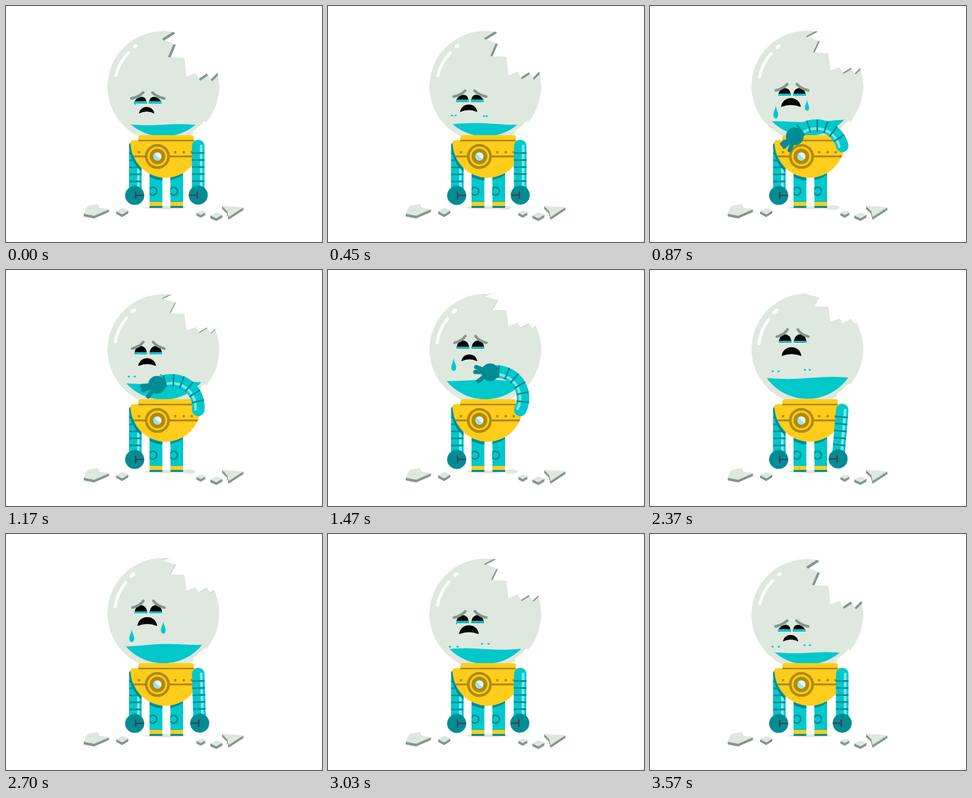
An HTML page with a canvas for the animation above (3600 ms loop, 480x360 px).

```html
<!DOCTYPE html>
<html>
<head>
<meta charset="utf-8">
<title>Sad robot</title>
<style>
html, body { margin: 0; width: 100%; height: 100%; overflow: hidden; background: #fff }
canvas { display: block; width: 480px; height: 360px }
</style>
</head>
<body>
<canvas id="stage" width="480" height="360"></canvas>
<script>
const c = document.getElementById('stage').getContext('2d');
const LOOP = 3600, TAU = Math.PI * 2, RAD = Math.PI / 180;
const GLASS = '#dee8df', EDGE = '#839690', CYAN = '#00c8cb', LIGHT = '#7ce6e8',
  TEAL = '#008c95', GOLD = '#ffcd1a', BROWN = '#b08a0f', BLACK = '#000';

// Broken rim of the glass head while it is bowed.
const RIM = [[254, 39], [237, 50], [258, 59], [250, 78], [271, 79], [274, 108],
  [288, 102], [293, 111], [305, 103], [311, 112], [321, 102]];

const lerp = (a, b, k) => a + (b - a) * k;
const ease = k => (1 - Math.cos(Math.PI * Math.min(1, Math.max(0, k)))) / 2;
const ramp = (t, from, to) => ease((t - from) / (to - from));
const bump = (t, from, to) => Math.sin(Math.PI * ramp(t, from, to));

function pose(t) {
  const raise = ramp(t, 450, 870), wipe = ramp(t, 870, 1470), fling = ramp(t, 1500, 2110),
    unroll = ramp(t, 1880, 2180), drop = ramp(t, 2110, 2330);
  const swing = t > 2300 ? 9 * Math.sin((t - 2300) / 90) * Math.exp((2300 - t) / 250) : 0;
  const h = ramp(t, 100, 2200) - ramp(t, 2200, 3560);
  const lift = bump(t, 1600, 2300);
  return {
    h, lift,
    base: 149 - 40 * h,
    level: 181 - 17 * h,
    cy: 123 - 2.5 * h - 2 * lift,
    mouth: ramp(t, 100, 870) - .9 * bump(t, 870, 1980) - ramp(t, 3030, 3540),
    angle: 90 + 165 * raise + 40 * wipe + 75 * fling + 80 * drop + swing,
    turn: 130 * (unroll - raise),
    length: 75 + 17 * (raise - drop) + 14 * bump(t, 1980, 2240),
    fingers: raise - drop,
    spread: .4 + .2 * wipe + .4 * fling
  };
}

function trace(points) {
  c.beginPath();
  points.forEach(p => c.lineTo(p[0], p[1]));
}
function fill(color) {
  c.fillStyle = color;
  c.fill();
}
function stroke(color, width, cap = 'butt') {
  c.strokeStyle = color;
  c.lineWidth = width;
  c.lineCap = cap;
  c.stroke();
}
function poly(color, points) {
  trace(points);
  fill(color);
}
function oval(color, x, y, rx, ry = rx) {
  c.beginPath();
  c.ellipse(x, y, rx, ry, 0, 0, TAU);
  fill(color);
}
function arc(color, width, x, y, r, from, to, cap) {
  c.beginPath();
  c.arc(x, y, r, from, to);
  stroke(color, width, cap);
}
function box(color, x, y, w, h) {
  c.fillStyle = color;
  c.fillRect(x, y, w, h);
}
function line(color, width, a, b, cap) {
  trace([a, b]);
  stroke(color, width, cap);
}

// A flat splinter with a thick lower edge.
function shard(points) {
  for (let d = 4; d > 0; d -= .5) poly(EDGE, points.map(([x, y]) => [x, y + d]));
  poly(GLASS, points);
}
const kite = (x, y, w, h) => [[x, y + h / 2], [x + w / 2, y], [x + w, y + h * .4], [x + w / 2, y + h]];

function ground(armOut) {
  shard([[118, 317], [124, 305], [139, 302], [142, 308], [157, 310], [134, 320]]);
  shard([[328, 305], [361, 307], [338, 322], [336, 313]]);
  shard(kite(167, 308, 19, 10));
  shard(kite(289, 312, 14, 7));
  shard(kite(310, 315, 19, 9));
  oval(GLASS, 242, 307.5, 32, 2.5);
  if (armOut > 0) oval(GLASS, 268 + 10 * armOut, 307.5, 10, 3.5);
}

function legs() {
  for (const x of [218, 249.5]) {
    c.save();
    c.beginPath();
    c.rect(x, 250, 19.5, 58);
    c.clip();
    box(CYAN, x, 250, 20, 50);
    arc(TEAL, 2.5, x + 5, 282.5, 6, 0, TAU);
    box(GOLD, x, 299, 20, 6);
    box(TEAL, x, 305, 20, 3);
    c.restore();
  }
}

// An arm bent along a circular arc; returns the wrist [x, y, direction].
function arm(x, y, angle, turn, length) {
  const steps = 42, bands = 6, step = length / steps, path = [];
  for (let i = 0; i <= steps; i++) {
    const a = (angle + turn * i / steps) * RAD;
    path.push([x, y, a]);
    x += Math.cos(a) * step;
    y += Math.sin(a) * step;
  }
  const side = (p, d) => [p[0] + Math.sin(p[2]) * d, p[1] - Math.cos(p[2]) * d];
  trace(path);
  stroke(CYAN, 19, 'round');
  trace(path.map(p => side(p, 4.5)));
  stroke(LIGHT, 4, 'round');
  for (let i = 1; i <= bands; i++) {
    const p = path[i * steps / (bands + 1)];
    line(TEAL, 2.5, side(p, -9.5), side(p, 9.5));
  }
  return path[steps];
}

function fist(x, y, dir) {
  const bar = (...ends) => line('#4a3d4a', 2.2, ...ends);
  oval(TEAL, x, y, 14.5);
  bar([x + dir * 1.5, y], [x + dir * 13.5, y]);
  bar([x + dir * 1.5, y - 5.5], [x + dir * 1.5, y + 5.5]);
}

function bowl(dx, dy) {
  c.beginPath();
  c.ellipse(242.5 + dx, 207 + dy, 53.5, 55, 0, 0, Math.PI);
  c.lineTo(191 + dx, 205 + dy);
  c.lineTo(294 + dx, 205 + dy);
  c.closePath();
}

function body(lift) {
  c.save();
  c.beginPath();
  c.rect(187, 205 - 4 * lift, 19, 70);
  c.rect(218, 250, 19.5, 40);
  c.rect(249.5, 250, 19.5, 40);
  c.clip();
  bowl(-2, 4 - 2.5 * lift);
  fill(TEAL);
  c.restore();

  c.save();
  c.translate(0, -2.5 * lift);
  c.beginPath();
  c.roundRect(201, 197, 84.5, 12, [4, 4, 0, 0]);
  fill(GOLD);
  bowl(0, 0);
  fill(GOLD);
  box(BROWN, 201, 204, 84, 2.5);
  c.save();
  c.clip();
  box(BROWN, 185, 228, 115, 3);
  c.restore();
  for (const x of [202, 257, 270, 282]) oval(BROWN, x, 223, 2);
  oval(GOLD, 230, 229.5, 19);
  arc(BROWN, 4, 230, 229.5, 17, 0, TAU);
  oval(BROWN, 230, 229.5, 12);
  oval('#e8f7f5', 230, 229.5, 6.2);
  c.beginPath();
  c.arc(230, 229.5, 6.2, 45 * RAD, 225 * RAD);
  fill('#9fe3e4');
  c.restore();
}

function globe(t, { h, cy, level }) {
  const cx = 239;
  // Raising the head foreshortens the rim towards the crown.
  const rim = RIM.map(([x, y]) => [x, y - 3.6 * h * Math.sqrt(y - 35)]);
  const bearing = p => Math.atan2(p[1] - cy, p[0] - cx);
  c.save();
  c.beginPath();
  c.arc(cx, cy, 85, 0, TAU);
  c.clip();
  c.beginPath();
  c.arc(cx, cy, 85, bearing(rim[10]), bearing(rim[0]) + TAU);
  rim.forEach(p => c.lineTo(...p));
  fill(GLASS);
  const g = Math.max(0, 1 - h / .8);
  const thickness = (i, dx, dy) => {
    const a = rim[i], b = rim[i + 1], shift = p => [p[0] + dx * g, p[1] + dy * g];
    poly(EDGE, [a, b, shift(b), shift(a)]);
  };
  thickness(0, 3, 3);
  thickness(2, -4, 0);
  thickness(7, 2, 3);
  thickness(9, 2, 3);
  arc('#fff', 5, cx, cy, 84, 40 * RAD, 57 * RAD);
  c.beginPath();
  c.arc(cx, cy, 76, 0, TAU);
  c.clip();
  const phase = t / LOOP * TAU, surface = [[320, 220], [160, 220]];
  for (let x = 160; x <= 320; x += 4)
    surface.push([x, level + 1.3 * Math.sin((x - 180) / 19 + phase * 3) + (x - cx) / 50 * Math.cos(phase * 2)]);
  poly(CYAN, surface);
  c.restore();

  const turn = -.13 * h;
  arc('#fff', 4.5, cx, cy, 74, 3.37 + turn, 3.92 + turn, 'round');
  arc('#fff', 5.5, cx, cy, 75, 4.1 + turn, 4.12 + turn + .05 * h, 'round');
}

function face({ h, base, mouth }) {
  const open = Math.min(1, 2.5 * h), water = lerp(3.8, 2.5, h);
  for (const s of [-1, 1]) {
    c.save();
    c.translate(215.4 + 1.3 * h + s * 11.4, base);
    c.scale(s, 1);
    c.beginPath();
    c.moveTo(9.5, 0);
    c.bezierCurveTo(9.5, lerp(-9, -16.5, open), -9.5, lerp(-18, -16.5, open), -9.5, 0);
    fill(BLACK);
    c.save();
    c.clip();
    box(CYAN, -10, -water, 20, water);
    c.restore();
    c.beginPath();
    c.moveTo(lerp(13.5, 12.5, h), lerp(-8, -9, h));
    c.quadraticCurveTo(lerp(3, 1, h), lerp(-10, -12, h), lerp(-4.5, -3.5, h), lerp(-17, -20, h));
    stroke(EDGE, 4, 'round');
    c.restore();
  }
  const w = lerp(11.7, 15, mouth), top = -1.33 * lerp(10, 13.5, mouth);
  c.save();
  c.translate(213.7 + 1.3 * h, 164 - 34 * h);
  c.beginPath();
  c.moveTo(-w, 0);
  c.bezierCurveTo(-w + 2, top, w - 2, top, w, 0);
  c.quadraticCurveTo(0, -6, -w, 0);
  fill(BLACK);
  c.restore();
}

// Wells up at the eye, falls into the water and splashes.
function tear(side, age, { base, level }) {
  if (age < 0 || age > 650) return;
  const gravity = .00085, land = 100 + Math.sqrt((level - base - 4) / gravity);
  const k = Math.min(1, age / 270), x = side < 0 ? 196 - 5 * k : 236 + 3 * k;
  if (age < land) {
    const z = Math.max(.25, k);
    c.save();
    c.translate(x, base + gravity * Math.max(0, age - 100) ** 2);
    c.scale(z, z);
    c.beginPath();
    c.moveTo(0, -10);
    c.bezierCurveTo(1, -3, 4, 0, 3.7, 5);
    c.bezierCurveTo(3, 11, -3, 11, -3.7, 5);
    c.bezierCurveTo(-4, 0, -1, -3, 0, -10);
    fill(CYAN);
    c.restore();
  } else {
    const q = (age - land) / (650 - land), y = level - 48 * q * (1 - q) - 1;
    for (const s of [-1, 1]) oval(CYAN, x + s * 6 * q, y, 1.8, 1.3);
  }
}

function wavingArm(p) {
  const f = p.fingers, [x, y, a] = arm(292, 213.5 - 4 * p.lift, p.angle, p.turn, p.length);
  if (f < .02) return fist(x, y, -1);
  for (const bend of [-37, 27, 59]) {
    const b = a + bend * p.spread * RAD, reach = 22.5 * f;
    line(TEAL, 6.5, [x, y], [x + Math.cos(b) * reach, y + Math.sin(b) * reach], 'round');
  }
  oval(TEAL, x, y, 14.5 - f);
}

function draw(t) {
  const p = pose(t);
  c.clearRect(0, 0, 480, 360);
  ground(p.fingers);
  legs();
  globe(t, p);
  const [x, y] = arm(196.5, 214 - 4 * p.lift, 90, 0, 75);
  fist(x - 1, y, 1);
  body(p.lift);
  face(p);
  for (let i = 0; i < 6; i++) {
    const age = t - i * 600;
    tear(-1, age, p);
    if (i !== 2) tear(1, age - 40, p); // the third one is wiped away
  }
  wavingArm(p);
}

function frame() {
  draw(performance.now() % LOOP);
  requestAnimationFrame(frame);
}
frame();
</script>
</body>
</html>
```
